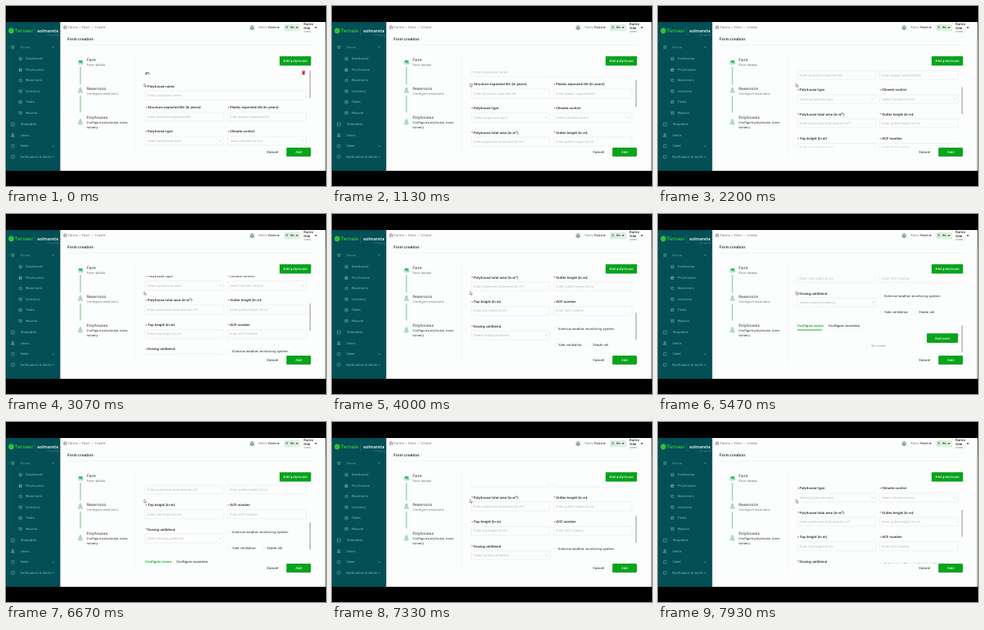
Write an HTML page with a canvas that moves like this. It is 400 by 225 pixels and loops after 8 s.

```html
<!DOCTYPE html>
<html lang="en">
<head>
<meta charset="utf-8">
<title>Form creation</title>
<style>
html, body { margin: 0; width: 100%; height: 100%; overflow: hidden; background: #000; }
canvas { display: block; width: 400px; height: 225px; }
</style>
</head>
<body>
<canvas id="stage"></canvas>
<script>
const canvas = document.getElementById('stage');
const ctx = canvas.getContext('2d');
const ratio = window.devicePixelRatio || 1;
canvas.width = 400 * ratio;
canvas.height = 225 * ratio;

const LOOP = 8000;
const GREEN = '#08a31c', STEP = '#3cb56a', INK = '#2a2c2c', SOFT = '#707373', HINT = '#b4b7b7', EDGE = '#e6e8e8';
// [time, scroll offset]
const SCROLL = [[0, 0], [70, 0], [1130, 29], [2200, 52], [4000, 108], [5250, 149], [5600, 149], [6670, 114], [7930, 74], [8000, 74]];

function scrollAt(t) {
  const i = Math.max(1, SCROLL.findIndex(k => k[0] >= t));
  const [t0, s0] = SCROLL[i - 1], [t1, s1] = SCROLL[i];
  return s0 + (s1 - s0) * (t - t0) / (t1 - t0);
}

function text(str, x, y, size = 4.2, color = INK, weight = 400, align = 'left') {
  ctx.font = `${weight} ${size}px Inter, sans-serif`;
  ctx.textRendering = 'geometricPrecision';
  ctx.fillStyle = color;
  ctx.textAlign = align;
  ctx.textBaseline = 'middle';
  ctx.fillText(str, x, y);
}

function rect(x, y, w, h, color) {
  ctx.fillStyle = color;
  ctx.fillRect(x, y, w, h);
}

function box(x, y, w, h, r, fill, stroke) {
  ctx.beginPath();
  ctx.roundRect(x, y, w, h, r);
  if (fill) { ctx.fillStyle = fill; ctx.fill(); }
  if (stroke) { ctx.strokeStyle = stroke; ctx.lineWidth = 0.6; ctx.stroke(); }
}

function line(points, color, width = 0.6) {
  ctx.beginPath();
  points.forEach(([x, y]) => ctx.lineTo(x, y));
  ctx.strokeStyle = color;
  ctx.lineWidth = width;
  ctx.stroke();
}

function shape(points, color) {
  ctx.beginPath();
  points.forEach(([x, y]) => ctx.lineTo(x, y));
  ctx.closePath();
  ctx.fillStyle = color;
  ctx.fill();
}

function dot(x, y, r, fill, stroke) {
  ctx.beginPath();
  ctx.arc(x, y, r, 0, 7);
  if (fill) { ctx.fillStyle = fill; ctx.fill(); }
  if (stroke) { ctx.strokeStyle = stroke; ctx.lineWidth = 0.7; ctx.stroke(); }
}

function chevron(x, y, color, up = 1) {
  line([[x - 1.4, y - 0.7 * up], [x, y + 0.7 * up], [x + 1.4, y - 0.7 * up]], color);
}

function caret(x, y) {
  shape([[x - 1.6, y - 0.8], [x + 1.6, y - 0.8], [x, y + 1]], INK);
}

function button(str, x, y, w, h) {
  box(x, y, w, h, 1, GREEN);
  text(str, x + w / 2, y + h / 2 + 0.2, 4.2, '#f2fbf3', 500, 'center');
}

function person(x, y, color, s = 1) {
  dot(x, y - 1.6 * s, 1.2 * s, null, color);
  ctx.beginPath();
  ctx.arc(x, y + 2.2 * s, 2.2 * s, Math.PI, 0);
  ctx.closePath();
  ctx.stroke();
}

function house(x, y, color) {
  line([[x - 2, y], [x, y - 2], [x + 2, y]], color, 0.7);
  ctx.strokeRect(x - 1.4, y, 2.8, 2);
}

function sidebar() {
  rect(0, 20, 67.5, 186, '#024f56');
  dot(6.5, 31, 3.4, '#35bd3b');
  text('Tervasi', 10.8, 31.2, 6.2, '#35bd3b', 700);
  line([[36, 25], [36, 37]], '#2f7a80', 0.5);
  text('solmareta', 39, 31, 5.5, '#eef7f5', 600);
  text('smart growing', 66, 36.5, 2.2, '#6f9fa1', 400, 'right');

  const pale = '#8db4b6', lit = '#63aa8c';
  text('Farms', 18, 51.3, 4.1, lit);
  house(8.5, 51, lit);
  chevron(59, 51.3, pale, -1);
  ['Dashboard', 'Polyhouses', 'Reservoirs', 'Inventory', 'Tasks', 'Reports'].forEach((name, i) => {
    const y = 66 + i * 13.5;
    text(name, 24.5, y, 4.1, pale);
    if (i === 1) house(18, y, pale);
    else box(16.3, y - 1.7, 3.4, 3.4, i === 2 ? 1.7 : 0.6, null, pale);
    if (i !== 2) line([[16.8, y], [19.2, y]], pale, 0.5);
  });
  ['Templates', 'Users', 'Sales', 'Notification & Alerts'].forEach((name, i) => {
    const y = 148 + i * 13.5;
    text(name, 18, y, 4.1, pale);
    if (i === 1) person(8.5, y, pale, 0.8);
    else box(6.6, y - 1.9, 3.8, 3.8, i ? 1.6 : 0.5, null, pale);
    if (i > 1) chevron(59, y, pale);
  });
}

function header() {
  house(74, 26.2, SOFT);
  text('Farms', 77.5, 27, 4.2, SOFT);
  text('›', 91.5, 26.8, 4.2, SOFT);
  text('Farm', 95, 27, 4.2, SOFT);
  text('›', 107, 26.8, 4.2, SOFT);
  text('Create', 111, 27, 4.2, SOFT);

  dot(307.6, 27, 4, '#e6f4e9');
  line([[305.6, 28.2], [306.3, 27], [306.3, 25.8], [307.6, 24.7], [308.9, 25.8], [308.9, 27], [309.6, 28.2], [305.6, 28.2]], '#24372b', 0.7);
  line([[307, 29.3], [308.2, 29.3]], '#24372b', 0.7);
  text('Farm:', 316, 27, 4.1, SOFT);
  text('Farm', 328, 27, 4.1, INK, 500);
  caret(340.3, 27);
  box(347.5, 22.5, 20.5, 9, 1.5, '#dff2e2');
  text('文', 349, 27, 4, '#24372b');
  text('En', 355.5, 27, 4.2, INK, 500);
  caret(363.8, 27);
  text('Karim', 372, 23, 4.2, INK, 600);
  text('Oda', 372, 27.5, 4.2, INK, 600);
  text('ADMIN', 372, 32, 2.8, SOFT);
  caret(387.3, 27);
}

function steps() {
  text('Form creation', 77, 41.2, 4.8, INK, 600);
  line([[77, 48.5], [383, 48.5]], '#eceeee', 0.6);
  line([[162, 60], [162, 188]], '#eff1f1', 0.6);
  line([[93, 76], [93, 98]], STEP, 0.8);
  line([[93, 112], [93, 133]], STEP, 0.8);
  box(90.6, 68, 5.2, 3, 0.8, STEP);
  dot(91.8, 71.4, 1.3, '#fff', STEP);
  dot(95, 71.6, 1, '#fff', STEP);
  person(93, 105.5, STEP, 1.1);
  person(93, 145, STEP, 1.1);
  text('Farm', 101, 67.2, 4.8, INK);
  text('Farm details', 101, 74, 4, SOFT);
  text('Reservoirs', 101, 103.2, 4.8, INK);
  text('Configure reservoirs', 101, 110, 4, SOFT);
  text('Polyhouses', 100.7, 139.2, 4.8, INK);
  text('Configure polyhouse, zone,', 100.5, 146, 4, INK);
  text('nursery', 100.5, 152, 4, INK);
}

function field(name, hint, x, y, w = 98, select = false) {
  text('*', x, y + 0.6, 4.4, '#b0444c', 600);
  text(name, x + 3, y, 4.2, INK, 600);
  box(x, y + 5.6, w, 11.3, 1.2, null, EDGE);
  text(hint, x + 3, y + 11.3, 4, HINT);
  if (select) chevron(x + w - 4, y + 11.3, HINT);
}

function check(name, x, y) {
  box(x - 5.2, y - 1.6, 3.2, 3.2, 0.5, null, '#eceeee');
  text(name, x, y, 4.1);
}

function form(scroll) {
  const L = 174, R = 277;
  ctx.save();
  ctx.beginPath();
  ctx.rect(163, 77.6, 216, 99.4);
  ctx.clip();
  ctx.translate(0, -scroll);

  text('#1', L, 84.3, 4.6, INK, 600);
  rect(370.3, 82, 3.2, 3.8, '#e0222a');
  rect(369.7, 80.8, 4.4, 0.8, '#e0222a');

  field('Polyhouse name', 'Enter polyhouse name', L, 100.3, 201);
  field('Structure expected life (in years)', 'Enter structure expected life', L, 127.2);
  field('Plastic expected life (in years)', 'Enter plastic expected life', R, 127.2);
  field('Polyhouse type', 'Select polyhouse type', L, 157.2, 98, true);
  field('Climate control', 'Select climate control', R, 157.2, 98, true);
  field('Polyhouse total area (in m²)', 'Enter polyhouse total area (in m²)', L, 187.3);
  field('Gutter height (in m)', 'Enter gutter height (in m)', R, 187.3);
  field('Top height (in m)', 'Enter top height (in m)', L, 218);
  field('ACF number', 'Enter ACF number', R, 218);
  field('Dosing unitblend', 'Select dosing unitblend', L, 248.3, 98, true);
  check('External weather monitoring system', 283, 251.3);
  check('Side ventilation', 283, 271.3);
  check('Shade net', 326, 271.3);

  text('Configure zones', L, 288.3, 4.1, GREEN, 600);
  text('Configure nurseries', 213, 288.3, 4.1, INK, 500);
  line([[L, 294.2], [375, 294.2]], '#eef0f0', 0.5);
  line([[L, 294], [205, 294]], GREEN, 0.9);
  button('Add zone', 336, 298.3, 39, 11.7);
  text('No zones', 275.5, 313.4, 4, '#8b8e8e', 400, 'center');
  ctx.restore();

  box(379.6, 81 + scroll * 0.39, 1, 34, 0.5, '#8d9090');
}

function cursor() {
  const tip = [[172.6, 96.8], [172.6, 101], [173.6, 100.2], [174.3, 101.6], [174.9, 101.3], [174.3, 99.9], [175.6, 99.8], [172.6, 96.8]];
  shape(tip, '#fff');
  line(tip, '#555', 0.5);
}

function draw(t) {
  ctx.setTransform(ratio, 0, 0, ratio, 0, 0);
  rect(0, 0, 400, 225, '#000');
  rect(67.5, 20, 332, 186, '#fcfdfd');
  sidebar();
  header();
  steps();
  form(scrollAt(t));
  rect(398.6, 42, 0.9, 164, '#bfc1c1');
  button('Add polyhouse', 342, 62.8, 39.3, 11.7);
  text('Cancel', 333, 182.5, 4.2, INK, 500, 'center');
  button('Add', 350.5, 177, 30.5, 11.3);
  cursor();
}

const start = performance.now();
function tick() {
  draw((performance.now() - start) % LOOP);
  requestAnimationFrame(tick);
}
tick();
</script>
</body>
</html>
```
